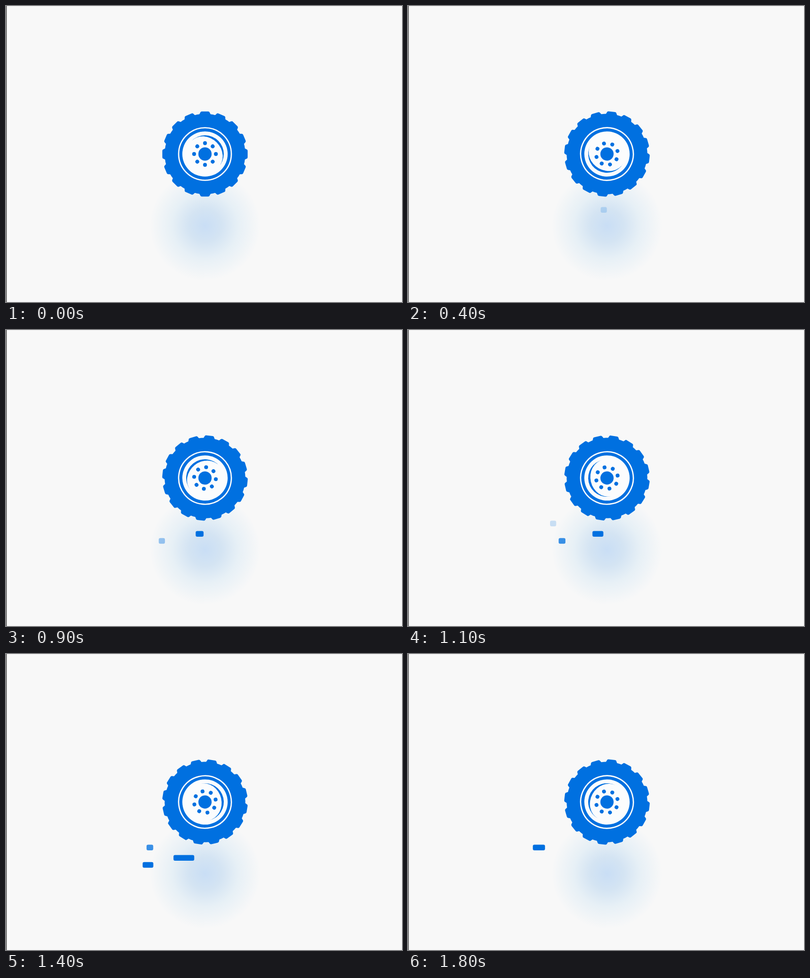
An HTML page that plays this animation: 800 by 600 pixels, repeating every 1.9 s.

```html
<!DOCTYPE html>
<html lang="en">
<head>
<meta charset="utf-8">
<title>Rolling wheel</title>
<style>
  html, body { margin: 0; width: 100%; height: 100%; overflow: hidden; background: #f8f8f8; }
  svg { display: block; width: 100vw; height: 100vh; }
</style>
</head>
<body>
<svg viewBox="0 0 800 600">
  <defs>
    <radialGradient id="glow">
      <stop offset="0" stop-color="#c9def5"/>
      <stop offset=".3" stop-color="#d4e4f3"/>
      <stop offset=".6" stop-color="#e7f0f6"/>
      <stop offset="1" stop-color="#f8f8f8"/>
    </radialGradient>
  </defs>
  <rect width="800" height="600" fill="#f8f8f8"/>
  <rect width="800" height="1" fill="#efefef"/>
  <rect width="1.4" height="600" fill="#4c4c4c"/>
  <circle cx="402" cy="445" r="112" fill="url(#glow)"/>
  <g id="bars" fill="#0070e0"></g>
  <g id="wheel" fill="#0070e0">
    <circle r="81.5"/>
    <g id="teeth"></g>
    <circle r="53.2" fill="none" stroke="#fbfcfd" stroke-width="2.6"/>
    <circle r="45.8" fill="#fbfcfd"/>
    <path d="M-38 0A38 38 0 0 1 38 0A38 33.4 0 0 0 -38 0Z" transform="rotate(45)"/>
    <g id="bolts"></g>
    <circle r="13.4"/>
  </g>
</svg>
<script>
const LOOP = 1900, STEP = 100;
const $ = id => document.getElementById(id);

function add(parent, tag, attrs) {
  const el = document.createElementNS('http://www.w3.org/2000/svg', tag);
  set(el, attrs);
  return parent.appendChild(el);
}

function set(el, attrs) {
  for (const k in attrs) el.setAttribute(k, attrs[k]);
}

function ring(parent, count, tag, attrs) {
  for (let i = 0; i < count; i++) {
    add(parent, tag, { ...attrs, transform: `rotate(${i * 360 / count})` });
  }
}

ring($('teeth'), 16, 'path', { d: 'M-12 -79L-9.8 -83.6Q-9 -86.2 -6.6 -86.2H6.6Q9 -86.2 9.8 -83.6L12 -79Z' });
ring($('bolts'), 8, 'circle', { cy: -22, r: 3.9 });

// Key poses of the roll: time and degrees, six turns per loop
const roll = [[0, 0], [400, 164], [600, 371], [900, 636], [1100, 932],
  [1400, 1472], [1800, 2054], [LOOP, 2160]];

function angle(t) {
  const i = roll.findIndex(([end]) => end > t);
  const [t0, a0] = roll[i - 1], [t1, a1] = roll[i];
  return a0 + (a1 - a0) * (t - t0) / (t1 - t0);
}

// Each bar fades in, then speeds off to the left while it stretches
const bars = [
  { start: 300, end: 1700, x: 389.3, y: 407.6, reach: 36.5, stretch: .58 },
  { start: 700, end: 1700, x: 309, y: 421.8, reach: 115, stretch: .28 },
  { start: 1000, end: 2200, x: 287, y: 386.6, reach: 76, stretch: .35 }
];
for (const bar of bars) bar.el = add($('bars'), 'rect', { height: 11.4, rx: 3.2 });

function drawBar({ el, start, end, x, y, reach, stretch }, t) {
  const age = Math.max(0, t - start);
  const shift = reach * (age / 1000) ** 3.5;
  set(el, {
    x: x - shift,
    y,
    width: 12.4 + shift * stretch,
    opacity: Math.max(0, Math.min(1, age / 520, (end - t) / 250))
  });
}

function draw() {
  const t = Math.floor(performance.now() % LOOP / STEP) * STEP;
  set($('wheel'), { transform: `translate(402 300) rotate(${angle(t)})` });
  for (const bar of bars) drawBar(bar, t);
  requestAnimationFrame(draw);
}
draw();
</script>
</body>
</html>
```
